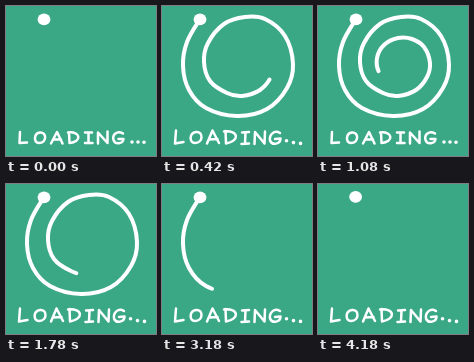
An HTML page that plays this animation: 150x150 px, repeating every 4280 ms.

```html
<!DOCTYPE html>
<html lang="en">
<head>
<meta charset="utf-8">
<title>Loading</title>
<style>
  html, body { margin: 0; width: 100%; height: 100%; overflow: hidden; background: #3aa885; }
  svg { display: block; width: 100%; height: 100%; }
  path { fill: none; stroke: #fff; stroke-linecap: round; stroke-linejoin: round; }
  circle, ellipse { fill: #fff; }
  .word { stroke-width: 2.5; }
  .dots { stroke-width: 3.6; }
</style>
</head>
<body>
<svg viewBox="0 0 150 150" role="img" aria-label="LOADING...">
  <g id="swirl">
    <path id="line" stroke-width="4"/>
    <ellipse cx="38" cy="13.3" rx="6.4" ry="5.9"/>
    <circle id="core" cx="85" cy="59" r="3.8"/>
  </g>
  <!-- Two hand-lettered versions that alternate to make the word wobble -->
  <g class="lettering">
    <path class="word" d="M14 126 L13.5 137 L21 136.5
      M34 126.5 C28 127 27 137 33 137 C41 137 41 126 34 126.5
      M45 137.5 L51 126 L56.5 137.5 M47.5 133.5 H55
      M63 126.5 L63.5 137 M62 126.5 C75 125 76 136 63.5 137
      M79 126.5 H86 M82.5 126.5 V137 M79 137 H86.5
      M92 137.5 V126.5 L101.5 137 V125.5
      M117 127.5 C111 124 106 129 107.5 134 C109 139 117 138 117.5 133 H112.5"/>
    <path class="dots" d="M126 136h.01M132 136h.01M138 136.3h.01"/>
  </g>
  <g class="lettering">
    <path class="word" d="M14 124.5 L13 137.5 L21.5 136
      M34 126 C27 127 27 137 33 137 C42 136.5 41 125 34 126
      M45 137.5 L50.5 124.5 L57 137 M47 133.5 L55.5 133
      M63.5 125 L64 137.5 M62 125.5 C77 124 78 135 64 137.5
      M80 126.5 L87 126 M83.5 126.5 L83 137.5 M79.5 138 L87 137.5
      M92.5 138 L93 126 L102.5 137.5 L103 125.5
      M118 127 C112 123.5 107 129 108 134.5 C110 140 118.5 138 118.5 132.5 L113 133"/>
    <path class="dots" d="M124.5 134.8h.01M131.5 136.6h.01M138.5 137.4h.01"/>
  </g>
</svg>
<script>
const LOOP = 4280, FAST = 20, SLOW = 100, SLOW_START = 580;
const FULL = 28;          // steps needed to draw the whole spiral
const MIRROR = 60;        // pose at which the spiral has shrunk to its dot

const points = [
  [38,13], [25,36], [21,60], [27,84], [44,102], [75,110], [105,103], [125,82],
  [131,58], [123,30], [103,13], [83,11], [62,18], [46,37], [42,56], [48,75],
  [65,87], [80,90], [98,84], [109,71], [112,57], [106,41], [94,33], [80,32],
  [66,39], [59,52], [61,66], [71,74], [82,72], [88,66], [85,59]
];

// Catmull-Rom curve through the points, written as cubic segments
function smoothPath(pts) {
  const at = i => pts[Math.max(0, Math.min(pts.length - 1, i))];
  let d = `M${pts[0]}`;
  for (let i = 0; i < pts.length - 1; i++) {
    const [a, b, c, e] = [at(i - 1), at(i), at(i + 1), at(i + 2)];
    const c1 = b.map((v, k) => v + (c[k] - a[k]) / 6);
    const c2 = c.map((v, k) => v - (e[k] - b[k]) / 6);
    d += `C${c1} ${c2} ${c}`;
  }
  return d;
}

const line = document.getElementById('line');
const core = document.getElementById('core');
const swirl = document.getElementById('swirl');
const lettering = document.querySelectorAll('.lettering');
line.setAttribute('d', smoothPath(points));
const total = line.getTotalLength();

function draw(time) {
  const t = time % LOOP;
  const pose = t < SLOW_START
    ? Math.floor(t / FAST)
    : SLOW_START / FAST + Math.floor((t - SLOW_START) / SLOW);
  const step = Math.max(0, Math.min(pose, FULL, MIRROR - pose));
  const odd = pose % 2;

  line.style.strokeDasharray = `${total * step / FULL} ${total * 2}`;
  line.style.visibility = step ? 'visible' : 'hidden';
  core.style.visibility = step === FULL ? 'visible' : 'hidden';

  const resting = step === FULL || (step === 0 && pose > 0);
  swirl.setAttribute('transform', resting && odd ? 'translate(-0.4 -0.5)' : '');
  lettering.forEach((g, i) => g.style.display = i === odd ? '' : 'none');
}

const start = performance.now();
function tick() {
  draw(performance.now() - start);
  requestAnimationFrame(tick);
}
tick();
</script>
</body>
</html>
```
